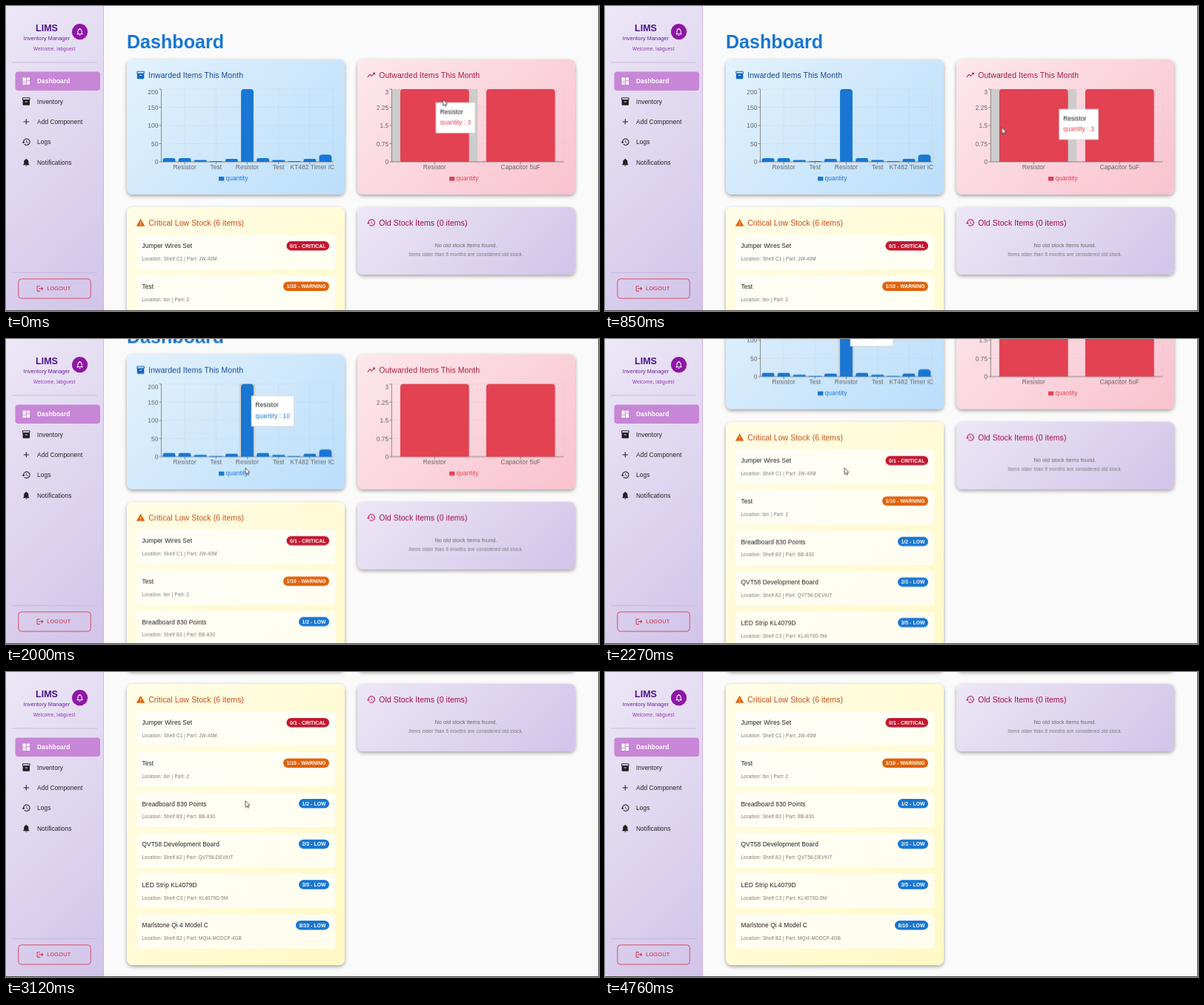
These frames come from a looping animation (800x411 px, 4790 ms). An HTML page:

```html
<!DOCTYPE html>
<html lang="en">
<head>
<meta charset="utf-8">
<title>Inventory dashboard</title>
<style>
html, body { margin: 0; width: 100%; height: 100%; overflow: hidden; background: #fafafa; }
#stage { position: absolute; left: 0; top: 0; width: 800px; height: 411px; overflow: hidden; background: #fafafa; }
#page { position: absolute; left: 0; top: 0; width: 800px; height: 700px; will-change: transform; }
svg { position: absolute; left: 0; top: 0; overflow: visible; font: 8.37px "Liberation Sans", Arial, sans-serif; letter-spacing: .00938em; }
.card { position: absolute; width: 294px; border-radius: 8px; box-shadow: 0 2px 5px rgba(0,0,0,.36); }
#side { position: absolute; left: 0; top: 0; width: 131px; height: 411px; border-right: 1px solid #d3b0e3;
  background: linear-gradient(135deg, #ede7f6, #d1c4e9); }
#edge { position: absolute; inset: 0; border: solid #484848; border-width: 0 1px 1px 0; }
.h3 { font-size: 25.1px; font-weight: bold; letter-spacing: 0; }
.h5 { font-size: 12.55px; font-weight: bold; letter-spacing: 0; }
.h6 { font-size: 10.46px; letter-spacing: .0075em; }
.bold { font-weight: bold; }
.body { font-size: 7.32px; letter-spacing: .0107em; }
.btn { font-size: 7.32px; letter-spacing: .0286em; }
.note { font-size: 6.28px; letter-spacing: .0333em; }
.chip { font-size: 6.8px; font-weight: bold; }
.mid { text-anchor: middle; }
.end { text-anchor: end; }
</style>
</head>
<body>
<div id="stage">
  <div id="page">
    <div class="card" style="left:163px;top:72px;height:182px;background:linear-gradient(135deg,#e3f2fd,#bbdefb)"></div>
    <div class="card" style="left:474px;top:72px;height:182px;background:linear-gradient(135deg,#fde8ec,#f9c2cf)"></div>
    <div class="card" style="left:163px;top:271px;height:378.5px;background:linear-gradient(135deg,#fffde7,#fff9c4)"></div>
    <div class="card" style="left:474px;top:271px;height:90.5px;background:linear-gradient(135deg,#ede7f6,#d1c4e9)"></div>
    <svg id="content" width="800" height="700"></svg>
  </div>
  <div id="side"><svg id="menu" width="131" height="411"></svg></div>
  <svg id="pointer" width="800" height="411"><g id="cursor">
    <path d="M0 0V8.6L2 6.8 3.3 9.6 4.6 9 3.4 6.2 6 6Z" fill="#fff" stroke="#333" stroke-width=".8" stroke-linejoin="round"/>
  </g></svg>
  <div id="edge"></div>
</div>
<script>
const LOOP = 4790;
const $ = id => document.getElementById(id);
const BLUE = '#1976d2', RED = '#e24252';

const bell = 'M12 22c1.1 0 2-.9 2-2h-4c0 1.1.89 2 2 2zm6-6v-5c0-3.07-1.64-5.64-4.5-6.32V4c0-.83-.67-1.5-1.5-1.5s-1.5.67-1.5 1.5v.68C7.63 5.36 6 7.92 6 11v5l-2 2v1h16v-1l-2-2z';
const icons = {
  bell,
  bellLine: bell + 'm-2 1H8v-6c0-2.48 1.51-4.5 4-4.5s4 2.02 4 4.5v6z',
  board: 'M3 13h8V3H3v10zm0 8h8v-6H3v6zm10 0h8V11h-8v10zm0-18v6h8V3h-8z',
  box: 'M20 2H4c-1 0-2 .9-2 2v3.01c0 .72.43 1.34 1 1.69V20c0 1.1 1.1 2 2 2h14c.9 0 2-.9 2-2V8.7c.57-.35 1-.97 1-1.69V4c0-1.1-1-2-2-2zm-5 12H9v-2h6v2zm5-7H4V4h16v3z',
  plus: 'M19 13h-6v6h-2v-6H5v-2h6V5h2v6h6v2z',
  clock: 'M13 3c-4.97 0-9 4.03-9 9H1l3.89 3.89.07.14L9 12H6c0-3.87 3.13-7 7-7s7 3.13 7 7-3.13 7-7 7c-1.93 0-3.68-.79-4.94-2.06l-1.42 1.42C8.27 19.99 10.51 21 13 21c4.97 0 9-4.03 9-9s-4.03-9-9-9zm-1 5v5l4.28 2.54.72-1.21-3.5-2.08V8H12z',
  exit: 'M17 7l-1.41 1.41L18.17 11H8v2h10.17l-2.58 2.58L17 17l5-5zM4 5h8V3H4c-1.1 0-2 .9-2 2v14c0 1.1.9 2 2 2h8v-2H4V5z',
  trend: 'M16 6l2.29 2.29-4.88 4.88-4-4L2 16.59 3.41 18l6-6 4 4 6.3-6.29L22 12V6z',
  warn: 'M1 21h22L12 2 1 21zm12-3h-2v-2h2v2zm0-4h-2v-4h2v4z'
};

const text = (x, y, s, cls, fill) => `<text x="${x}" y="${y}" class="${cls}" fill="${fill}">${s}</text>`;
const rect = (x, y, w, h, fill, r = 0, more = '') =>
  `<rect x="${x}" y="${y}" width="${w}" height="${h}" rx="${r}" fill="${fill}" ${more}/>`;
const line = (x1, y1, x2, y2, stroke, more = '') =>
  `<path d="M${x1} ${y1}L${x2} ${y2}" stroke="${stroke}" ${more}/>`;
const icon = (name, cx, cy, fill, k = .523) =>
  `<path d="${icons[name]}" fill="${fill}" transform="translate(${cx - 12 * k} ${cy - 12 * k}) scale(${k})"/>`;
const heading = (x, y, name, s, tint, fill) => icon(name, x, y, tint) + text(x + 10.6, y + 3.8, s, 'h6', fill);

function bar(x, w, h, fill) {
  const r = Math.min(4.2, h / 2), top = 210 - h;
  return `<path fill="${fill}" d="M${x} 210V${top + r}q0 ${-r} ${r} ${-r}h${w - 2 * r}q${r} 0 ${r} ${r}V210z"/>`;
}

function tooltip(id, w, value, color) {
  return `<g id="${id}">` + rect(0, 0, w, 41, '#fff', 0, 'stroke="#ccc" stroke-width=".6"') +
    text(5.5, 15.5, 'Resistor', '', '#222') + text(5.5, 30, 'quantity : ' + value, '', color) + '</g>';
}

// Plot area is 232 wide and 98 high, its base at y = 210.
function chart({ id, x0, values, max, ticks, labels, color, legendX, tip }) {
  const band = 232 / values.length, x1 = x0 + 232;
  const dash = 'stroke-width=".6" stroke-dasharray="1.6 1.6"';
  const center = i => x0 + band * (i + .5);
  let s = '';
  for (let i = 0; i < 5; i++) s += line(x0, 112 + i * 24.5, x1, 112 + i * 24.5, '#ccc', dash);
  for (const x of [x0, ...labels.map(l => center(l[0])), x1]) s += line(x, 112, x, 210, '#ccc', dash);
  s += `<g id="${id}Band">${rect(x0, 112, band, 98, '#ccc')}</g>`;
  s += line(x0, 112, x0, 210, '#666', 'stroke-width=".7"') + line(x0, 210, x1, 210, '#666', 'stroke-width=".7"');
  ticks.forEach((v, i) => {
    const y = 210 - i * 24.5;
    s += line(x0 - 3, y, x0, y, '#666', 'stroke-width=".7"') +
      text(x0 - 4, i == 4 ? y + 6.5 : y + 3, v, 'end', '#666');
  });
  for (const [i, name, dx = 0] of labels)
    s += line(center(i), 210, center(i), 213, '#666', 'stroke-width=".7"') +
      text(center(i) + dx, 220.3, name, 'mid', '#666');
  values.forEach((v, i) => s += bar(x0 + band * (i + .1), band * .8, 98 * v / max, color));
  s += rect(legendX, 230, 7.3, 5.5, color) + text(legendX + 9.6, 235.3, 'quantity', '', color);
  return s + tooltip(id + 'Tip', ...tip, color);
}

const stock = [
  ['Jumper Wires Set', 'Shelf C1', 'JW-40M', '0/1 - CRITICAL', 378.5, '#c2182f'],
  ['Test', 'bin', '2', '1/10 - WARNING', 374, '#e0620d'],
  ['Breadboard 830 Points', 'Shelf B3', 'BB-830', '1/2 - LOW', 395, BLUE],
  ['QVT58 Development Board', 'Shelf A2', 'QVT58-DEVKIT', '2/3 - LOW', 395, BLUE],
  ['LED Strip KL4079D', 'Shelf C3', 'KL4079D-5M', '3/5 - LOW', 395, BLUE],
  ['Marlstone Qi 4 Model C', 'Shelf B2', 'MQI4-MODCP-4GB', '8/10 - LOW', 391, BLUE]
];
const stockRow = ([name, place, part, level, x, color], i) => {
  const y = 308.5 + i * 54.6;
  return rect(176, y, 268.5, 46.3, '#fff', 4, 'fill-opacity=".7"') +
    text(183.4, y + 17.8, name, '', '#222') +
    text(183.4, y + 34.6, `Location: ${place} | Part: ${part}`, 'note', '#777') +
    rect(x, y + 8.4, 436 - x, 12.5, color, 6.25) +
    text((x + 436) / 2, y + 17, level, 'chip mid', '#fff');
};

$('content').innerHTML =
  text(163, 57, 'Dashboard', 'h3', BLUE) +
  heading(181.6, 93, 'box', 'Inwarded Items This Month', '#1565c0', '#174a96') +
  heading(492.6, 93, 'trend', 'Outwarded Items This Month', '#b71c3c', '#a81c3c') +
  heading(181.6, 292, 'warn', 'Critical Low Stock (6 items)', '#e0620d', '#cf4a14') +
  heading(492.6, 292, 'clock', 'Old Stock Items (0 items)', '#c2185b', '#a3084f') +
  text(620.5, 324.5, 'No old stock items found.', 'body mid', '#666') +
  text(620.5, 337, 'Items older than 6 months are considered old stock.', 'note mid', '#777') +
  stock.map(stockRow).join('') +
  chart({
    id: 'in', x0: 209.5, max: 200, ticks: [0, 50, 100, 150, 200], color: BLUE, legendX: 287,
    values: [10, 10, 5, 2, 8, 200, 10, 5, 2, 8, 20],
    labels: [[1, 'Resistor'], [3, 'Test'], [5, 'Resistor'], [7, 'Test'], [9, 'KT482 Timer IC', 3.5]],
    tip: [57.5, 10]
  }) +
  chart({
    id: 'out', x0: 520.3, max: 3, ticks: [0, .75, 1.5, 2.25, 3], color: RED, legendX: 598,
    values: [3, 3], labels: [[0, 'Resistor'], [1, 'Capacitor 5uF']],
    tip: [53, 3]
  });

const nav = [['board', 'Dashboard'], ['box', 'Inventory'], ['plus', 'Add Component'], ['clock', 'Logs'], ['bell', 'Notifications']];
$('menu').innerHTML =
  text(55, 33.8, 'LIMS', 'h5 mid', '#4a148c') +
  text(55, 45.6, 'Inventory Manager', 'body mid', '#6a1b9a') +
  text(65.3, 60, 'Welcome, labguest', 'note mid', '#9030b0') +
  `<circle cx="99.6" cy="34.7" r="10.6" fill="#8e16a6"/>` + icon('bellLine', 99.6, 34.7, '#fff') +
  line(8, 76, 123, 76, '#c5aed6', 'stroke-width=".8"') +
  line(8, 359.3, 123, 359.3, '#c5aed6', 'stroke-width=".8"') +
  rect(12.5, 88.6, 114.5, 25.4, '#c786d6', 4) +
  nav.map(([name, label], i) => {
    const y = 101.2 + i * 27.35, fill = i ? '#222' : '#fff';
    return icon(name, 27.3, y, fill) + text(42, y + 3, label, i ? '' : 'bold', fill);
  }).join('') +
  rect(16.8, 367.8, 97.5, 26.2, 'none', 4, 'stroke="#d8405a" stroke-width=".9"') +
  icon('exit', 46, 380.8, '#cc2440', .436) +
  text(55.2, 383.3, 'LOGOUT', 'btn', '#cc2440');

// Each step is [ms, x, y]; shown steps are [ms, 0 or 1].
function play(id, frames) {
  frames.push({ ...frames.at(-1), offset: 1 });
  const a = $(id).animate(frames, { duration: LOOP, iterations: Infinity });
  a.startTime = 0;
}
const move = (id, steps, easing = 'linear') =>
  play(id, steps.map(([t, x, y]) => ({ offset: t / LOOP, transform: `translate(${x}px,${y}px)`, easing })));
const show = (id, steps) =>
  play(id, steps.map(([t, o]) => ({ offset: t / LOOP, opacity: o, easing: 'step-end' })));

move('page', [[0, 0, 0], [1870, 0, 0], [2000, 0, -51], [2270, 0, -159], [2440, 0, -225], [2540, 0, -248], [2640, 0, -255]]);
move('cursor', [[0, 589.5, 125.8], [250, 618, 138], [500, 622, 150], [700, 590, 159], [850, 536, 163.6], [980, 450, 170],
  [1130, 372, 174], [1280, 332, 174], [1450, 325.5, 173.6], [1650, 323, 173.6], [3900, 323, 173.6], [4100, 310, 240], [4380, 290, 425]]);
move('outTip', [[0, 580, 130], [300, 618, 144], [550, 628, 154], [700, 627, 150], [850, 613, 139], [920, 585, 130]]);
show('outTip', [[0, 1], [890, 0]]);
show('outBand', [[0, 1], [890, 0]]);
move('inTip', [[0, 384, 124], [1000, 384, 124], [1250, 366, 127], [1450, 347.3, 129], [1600, 335, 128], [1720, 331, 128]]);
show('inTip', [[0, 0], [1000, 1]]);
show('inBand', [[0, 0], [1000, 1]]);
const band = 232 / 11;
move('inBand', [[0, 10], [1000, 10], [1030, 9], [1070, 8], [1110, 7], [1180, 6], [1260, 5]].map(([t, i]) => [t, i * band, 0]), 'step-end');
</script>
</body>
</html>
```
